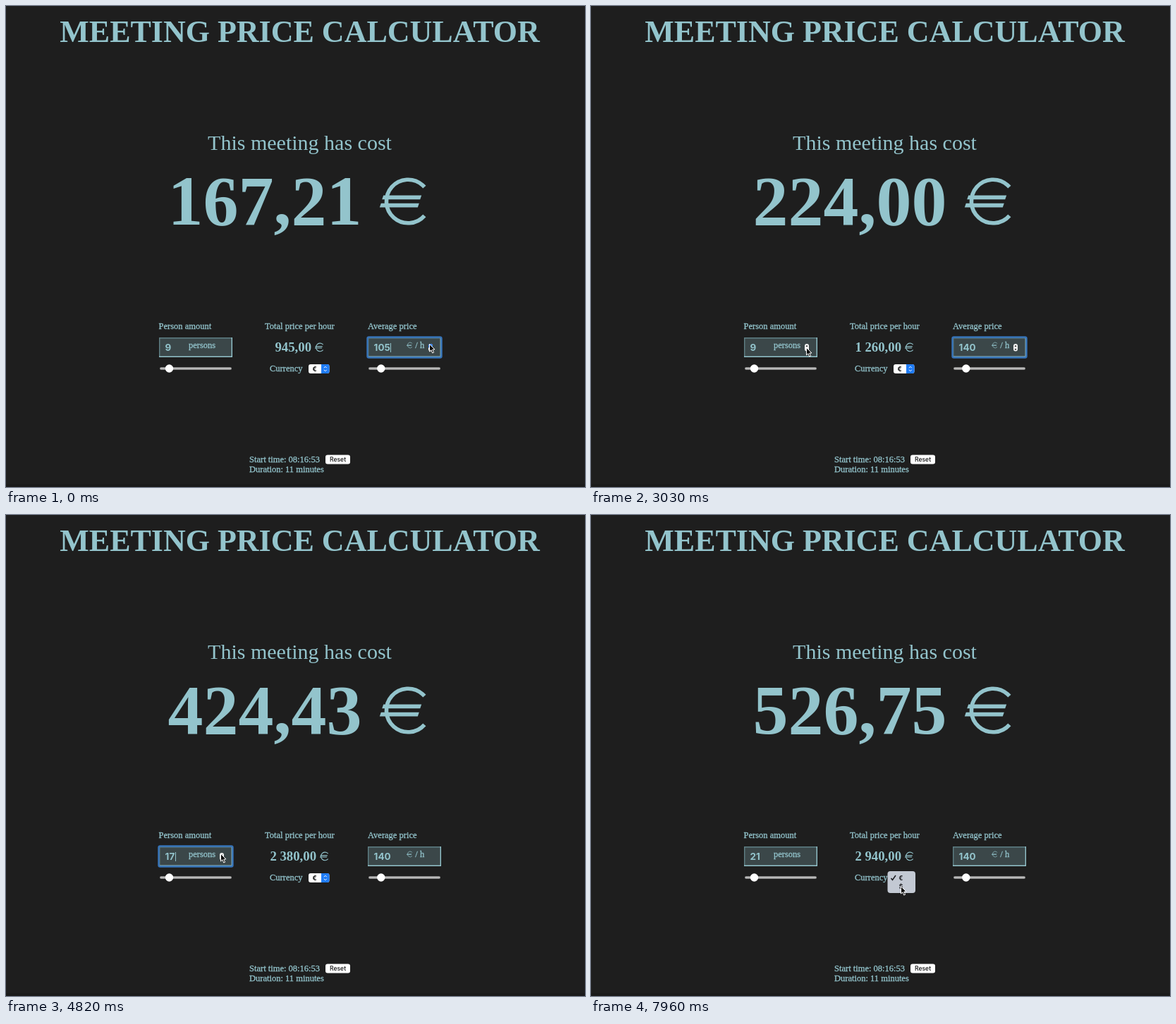
Animation, 821 px wide and 682 px high, one loop 8 s. Source, as an HTML page with a canvas:

```html
<!DOCTYPE html>
<html lang="en">
<head>
<meta charset="utf-8">
<title>Meeting price calculator</title>
<style>
  html, body { margin: 0; width: 100%; height: 100%; overflow: hidden; background: #1e1e1e; }
  canvas { display: block; }
</style>
</head>
<body>
<canvas id="stage" width="821" height="682"></canvas>
<script>
const ctx = document.getElementById('stage').getContext('2d');
const LOOP = 8000;
const STEP = 150; // screen refresh in ms
const TEAL = '#93c4cc';
const SERIF = '"Liberation Serif", Times, serif';
const UI = 'Inter, "Liberation Sans", sans-serif';
const LABEL = `12.5px ${SERIF}`;
const MID = 416.5;

const LAST_PRICE_CLICK = 1350;
const PERSONS_FOCUS = 3450;
const LAST_PERSON_CLICK = 5400;
const MENU_OPEN = 6900;
const MENU_HOVER = 7200;
const MENU_CHOICE = 7950;

// Pointer stops: arrival time, x, y, and travel time from the stop before.
const stops = [
  { at: 0, x: 600, y: 479, travel: 0 },
  { at: 2250, x: 200, y: 486, travel: 600 },
  { at: 2850, x: 305, y: 484, travel: 600 },
  { at: 3450, x: 304, y: 480, travel: 400 },
  { at: 6400, x: 440, y: 525, travel: 700 },
  { at: 6600, x: 440, y: 517, travel: 200 },
  { at: 7350, x: 439, y: 526, travel: 300 }
];

const clamp = (v, lo, hi) => Math.min(hi, Math.max(lo, v));
const ease = p => p * p * (3 - 2 * p);
const blinkOn = since => since < 0 || since % 1000 < 500;

function pointerAt(t) {
  const pos = { ...stops[0] };
  for (const stop of stops.slice(1)) {
    const p = ease(clamp((t - stop.at + stop.travel) / stop.travel, 0, 1));
    pos.x += (stop.x - pos.x) * p;
    pos.y += (stop.y - pos.y) * p;
  }
  return pos;
}

// Holding the price arrow adds 5 per refresh, then one more click follows.
function priceAt(t) {
  return 105 + 5 * Math.min(t / STEP, 6) + (t >= LAST_PRICE_CLICK ? 5 : 0);
}

// Twelve clicks spread evenly.
function personsAt(t) {
  const start = 3280;
  return 9 + clamp(Math.floor(12 * (t - start) / (LAST_PERSON_CLICK - start)), 0, 12);
}

function stateAt(time) {
  const t = Math.floor(time / STEP) * STEP;
  const focus = t < PERSONS_FOCUS ? 'price' : t < MENU_OPEN ? 'persons' : 'none';
  const lastEdit = focus === 'price' ? LAST_PRICE_CLICK : LAST_PERSON_CLICK;
  return {
    seconds: 637 + Math.floor((t + 960) / 1000),
    price: priceAt(t),
    persons: personsAt(t),
    focus,
    caret: blinkOn(t - lastEdit),
    pressed: t <= LAST_PRICE_CLICK,
    menuOpen: t >= MENU_OPEN,
    menuRow: t >= MENU_CHOICE ? -1 : t >= MENU_HOVER ? 1 : 0,
    pointer: pointerAt(t)
  };
}

function money(n) {
  return n.toFixed(2).replace('.', ',').replace(/\B(?=(\d{3})+,)/, ' ');
}

function text(str, x, y, font, color = TEAL, align = 'left') {
  ctx.font = font;
  ctx.fillStyle = color;
  ctx.textAlign = align;
  ctx.fillText(str, x, y);
}

// Small labels get a hairline outline for a slightly heavier weight.
function label(str, x, y) {
  text(str, x, y, LABEL);
  ctx.strokeStyle = TEAL;
  ctx.lineWidth = 0.3;
  ctx.strokeText(str, x, y);
}

function rounded(x, y, w, h, r, color) {
  ctx.fillStyle = color;
  ctx.beginPath();
  ctx.roundRect(x, y, w, h, r);
  ctx.fill();
}

function trace(points) {
  ctx.beginPath();
  points.forEach(([x, y]) => ctx.lineTo(x, y));
}

function polygon(points, color) {
  trace(points);
  ctx.closePath();
  ctx.fillStyle = color;
  ctx.fill();
}

function polyline(points, color, width) {
  trace(points);
  ctx.strokeStyle = color;
  ctx.lineWidth = width;
  ctx.stroke();
}

// Round euro sign: radius of six strokes, bars one stroke thick and one apart.
function euro(x, y, size) {
  const unit = 5.6, cx = 40.7, cy = -32.5, radius = unit * 5.5;
  ctx.save();
  ctx.translate(x, y);
  ctx.scale(size / 100, size / 100);
  ctx.strokeStyle = TEAL;
  ctx.lineWidth = unit;
  ctx.beginPath();
  ctx.arc(cx, cy, radius, 0.72, Math.PI * 2 - 0.72);
  ctx.stroke();
  for (const side of [-1, 1]) {
    const top = cy + (side - 0.5) * unit, left = 2 - side * 1.7;
    polygon([[left + 2, top], [left + 56, top], [left + 54, top + unit], [left, top + unit]], TEAL);
  }
  ctx.restore();
}

function spinner(x, pressed) {
  rounded(x - 3, 479, 6, 10.5, 3, '#f4f4f4');
  if (pressed) rounded(x - 3, 479, 6, 5.5, [3, 3, 0, 0], '#2f7df0');
  for (const dir of [-1, 1]) {
    const y = 484.5 + dir * 1.5;
    polygon([[x - 1.5, y], [x, y + dir * 2.2], [x + 1.5, y]], pressed && dir < 0 ? '#fff' : '#222');
  }
}

function field(x, value, focused, state, pressed) {
  const y = 470, w = 104, h = 28;
  const { pointer } = state;
  const hovered = pointer.x >= x && pointer.x <= x + w && pointer.y >= y && pointer.y <= y + h;
  ctx.fillStyle = '#3b4749';
  ctx.fillRect(x, y, w, h);
  polyline([[x + 0.7, y + h], [x + 0.7, y + 0.7], [x + w, y + 0.7]], '#5f7f85', 1.4);
  polyline([[x, y + h - 0.7], [x + w - 0.7, y + h - 0.7], [x + w - 0.7, y]], TEAL, 1.4);
  if (focused) {
    ctx.beginPath();
    ctx.roundRect(x - 0.5, y - 0.5, w + 1, h + 1, 2);
    ctx.strokeStyle = '#3673b8';
    ctx.lineWidth = 2.4;
    ctx.stroke();
  }
  text(value, x + 8.6, 489, `bold 13.5px ${UI}`);
  if (focused && state.caret) {
    ctx.fillRect(Math.round(x + 9 + ctx.measureText(value).width), 478, 1, 13);
  }
  if (focused || hovered) spinner(x + 89, pressed);
}

function slider(x, thumb) {
  rounded(x, 512, 102, 4, 2, '#777');
  rounded(x + 0.5, 512.7, 101, 2.6, 1.3, '#b9b9b9');
  ctx.fillStyle = '#fff';
  ctx.beginPath();
  ctx.arc(thumb, 514, 5.7, 0, Math.PI * 2);
  ctx.fill();
}

function select() {
  rounded(429, 508, 29.5, 13, 3, '#fff');
  rounded(447, 508, 11.5, 13, [0, 3, 3, 0], '#1f7cf7');
  for (const dir of [-1, 1]) {
    const y = 514.5 + dir * 1.3;
    polyline([[450.8, y], [452.8, y + dir * 2], [454.8, y]], '#fff', 1);
  }
  text('€', 437.5, 517.5, `bold 9px ${UI}`, '#111', 'center');
}

function menu(activeRow) {
  rounded(420.5, 505, 39.5, 31, 4, '#c3c9d3');
  ['€', '$'].forEach((sign, row) => {
    const top = 509 + row * 12, active = row === activeRow;
    const ink = active ? '#fff' : '#1b1b1f';
    if (active) {
      ctx.fillStyle = '#2f7cf6';
      ctx.fillRect(420.5, top, 39.5, 12);
    }
    if (row === 0) polyline([[425.5, 515], [427.5, 517.5], [432, 511]], ink, 1.5);
    text(sign, 439.5, top + 8.5, `bold 8.5px ${UI}`, ink, 'center');
  });
}

function drawPointer({ x, y }) {
  ctx.save();
  ctx.translate(x, y);
  const arrow = [[0.5, 0.5], [0.5, 11], [2.9, 8.8], [4.7, 13], [6.6, 12.2], [4.8, 8.1], [8, 8]];
  polygon(arrow, '#0a0a0a');
  ctx.closePath();
  ctx.strokeStyle = '#fff';
  ctx.lineWidth = 1;
  ctx.stroke();
  ctx.restore();
}

function drawStatic() {
  ctx.fillStyle = '#1e1e1e';
  ctx.fillRect(0, 0, 821, 682);
  ctx.fillStyle = '#1a1a1a';
  ctx.fillRect(0, 678, 821, 4);
  text('MEETING PRICE CALCULATOR', MID, 51, `bold 44px ${SERIF}`, TEAL, 'center');
  text('This meeting has cost', MID, 204, `30px ${SERIF}`, TEAL, 'center');
  label('Person amount', 216.5, 458);
  label('Total price per hour', 367, 458);
  label('Average price', 513, 458);
  label('Currency', 374, 518);
  label('Start time: 08:16:53', 345, 646.5);
  label('Duration: 11 minutes', 345, 661);
  rounded(453, 636.5, 35, 13, 3, '#fff');
  text('Reset', 470.5, 646.3, `500 8.6px ${UI}`, '#111', 'center');
  slider(218, 231.5);
  slider(514, 531.8);
}

// Bold amount followed by the euro sign, centred on the page.
function drawAmount(amount, y, size) {
  const str = money(amount), font = `bold ${size}px ${SERIF}`;
  ctx.font = font;
  const signAt = ctx.measureText(str).width + size * 0.25;
  const left = MID - (signAt + size * 0.74) / 2;
  text(str, left, y, font);
  euro(left + signAt, y, size);
}

function draw(time) {
  const state = stateAt(time);
  const hourly = state.persons * state.price;

  drawStatic();
  drawAmount(hourly * state.seconds / 3600, 309.5, 100);
  drawAmount(hourly, 490, 18.75);

  field(217, String(state.persons), state.focus === 'persons', state, false);
  label('persons', 259, 485);
  field(513, String(state.price), state.focus === 'price', state, state.pressed);
  euro(568, 485, 12.5);
  label(' / h', 577.2, 485);

  if (state.menuOpen) menu(state.menuRow);
  else select();
  drawPointer(state.pointer);
}

function frame() {
  draw(performance.now() % LOOP);
  requestAnimationFrame(frame);
}
frame();
</script>
</body>
</html>
```
